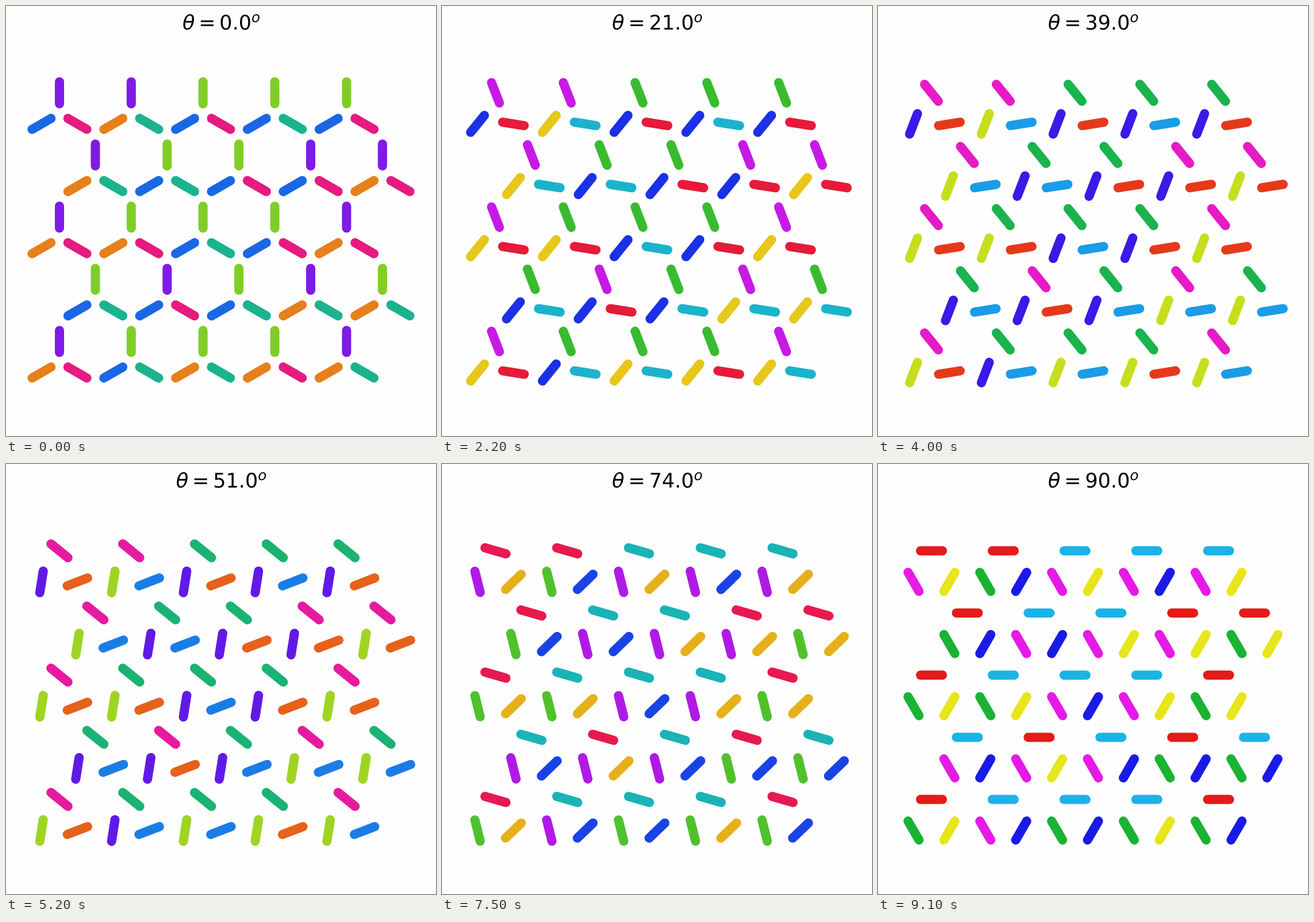
An HTML page for the animation above (9.2 s loop, 748 by 748 pixels).

```html
<!DOCTYPE html>
<html lang="en">
<head>
<meta charset="utf-8">
<title>Rotating bond lattice</title>
<style>
  html, body { margin: 0; width: 100%; height: 100%; overflow: hidden; background: #fefefe; }
  svg { display: block; width: 100vw; height: 100vh; }
  line { stroke-width: 16; stroke-linecap: round; }
  text { font: 35px "DejaVu Sans", sans-serif; text-rendering: geometricPrecision; }
  .italic { font-style: italic; }
  #degree { font-size: 24.5px; }
</style>
</head>
<body>
<svg viewBox="0 0 748 748">
  <g id="bars"></g>
  <g id="title">
    <text class="italic" x="0" y="41">θ</text>
    <text x="28.2" y="41">=</text>
    <text id="value" x="64.4" y="41">0.0</text>
    <text id="degree" class="italic" y="27.5">o</text>
  </g>
</svg>
<script>
  const LOOP = 9200, STEP = 100;
  const CELL = 124.86, ROW = CELL * Math.sqrt(3) / 2;
  const EM = 35, DIGIT = 0.636 * EM, POINT = 0.318 * EM;

  // Colour wheel, one stop every 60 degrees
  const WHEEL = [
    [230, 26, 26], [230, 230, 26], [26, 179, 51],
    [26, 179, 230], [26, 26, 230], [230, 26, 230]
  ];

  // 1 marks a bar pointing the opposite way
  const UPRIGHT = ["11000", "10011", "10001", "01010", "10001"];
  const SLANTED = ["1001101110", "0111101000", "0000111000", "1110110101", "0011010001"];

  const byId = id => document.getElementById(id);
  const bars = [];

  function addBar(x, y, angle, flipped) {
    const el = document.createElementNS("http://www.w3.org/2000/svg", "line");
    el.setAttribute("x1", -19);
    el.setAttribute("x2", 19);
    byId("bars").append(el);
    bars.push({ el, x, y, angle, hue: angle + (flipped === "1" ? 180 : 0) });
  }

  for (let row = 0; row < 5; row++) {
    const shift = row % 2 * CELL / 2;
    const y = 151 + row * ROW;
    [...UPRIGHT[row]].forEach((bit, i) => addBar(93 + shift + i * CELL, y, 90, bit));
    [...SLANTED[row]].forEach((bit, i) =>
      addBar(61.8 + shift + i * CELL / 2, y + ROW / 2, i % 2 ? -30 : 30, bit));
  }

  function wheelColor(hue) {
    const pos = (hue + 360) % 360 / 60;
    const i = Math.floor(pos);
    const next = WHEEL[(i + 1) % 6];
    return `rgb(${WHEEL[i].map((c, k) => Math.round(c + (next[k] - c) * (pos - i)))})`;
  }

  function draw(theta) {
    for (const { el, x, y, angle, hue } of bars) {
      el.setAttribute("transform", `translate(${x} ${y}) rotate(${-angle - theta})`);
      el.setAttribute("stroke", wheelColor(hue + theta));
    }
    const label = theta.toFixed(1);
    const end = 64.4 + (label.length - 1) * DIGIT + POINT;
    byId("value").textContent = label;
    byId("degree").setAttribute("x", end);
    byId("title").setAttribute("transform", `translate(${374.5 - (end + 15) / 2} 0)`);
  }

  const start = performance.now();
  let shown = -1;

  function tick() {
    const time = (performance.now() - start) % LOOP;
    const theta = Math.max(0, Math.floor(time / STEP) - 1);
    if (theta !== shown) draw(shown = theta);
    requestAnimationFrame(tick);
  }
  tick();
</script>
</body>
</html>
```
